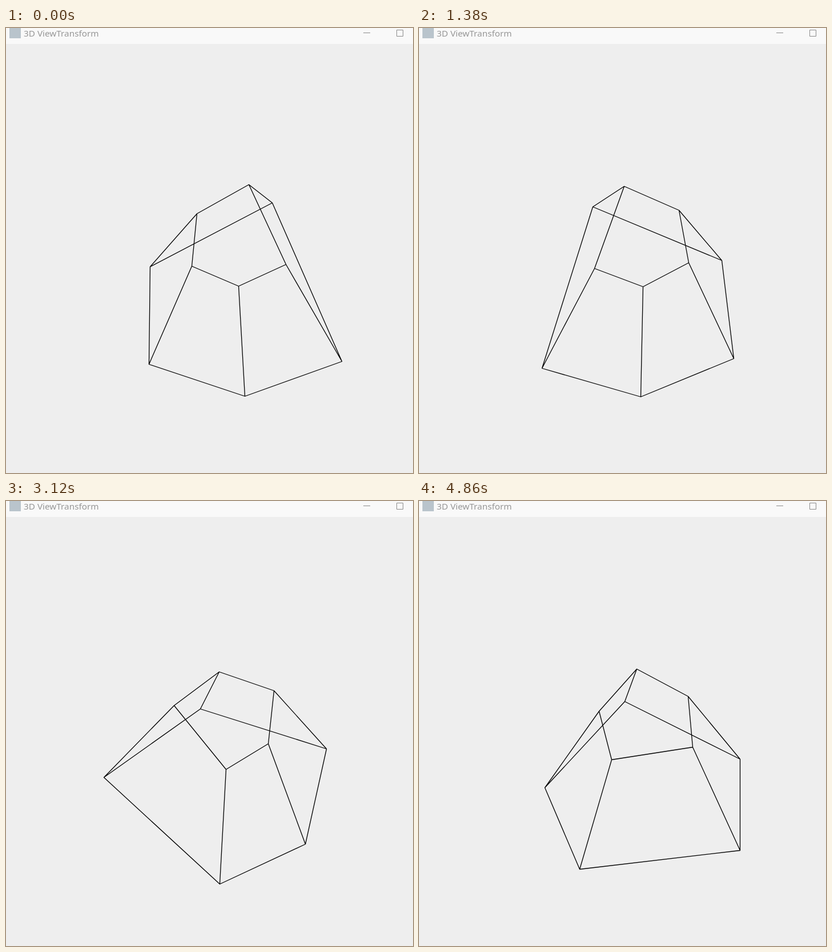
Animation of 713x780 px, one loop 4.92 s. Source, as an HTML page:

```html
<!DOCTYPE html>
<html lang="en">
<head>
<meta charset="utf-8">
<title>3D ViewTransform</title>
<style>
  html, body { margin: 0; width: 100%; height: 100%; overflow: hidden; background: #eee; }
  svg { display: block; }
  text { font: 15.3px "Noto Sans", "Open Sans", sans-serif; fill: #979797; }
</style>
</head>
<body>
<svg width="713" height="780" viewBox="0 0 713 780">
  <rect width="713" height="780" fill="#eee"/>
  <rect width="713" height="28" fill="#f9f9f9"/>
  <rect x="6" y="0" width="20" height="18" fill="#b9c4cc"/>
  <text x="31" y="15">3D ViewTransform</text>
  <path d="M626 8.5H638M684.5 3.5h11v11h-11z" fill="none" stroke="#8a8a8a"/>
  <path id="solid" fill="none" stroke="#000" stroke-width="1.3" stroke-linejoin="round"/>
</svg>
<script>
  const FRAME = 60, FRAMES = 82;
  const RAD = Math.PI / 180;

  // House-shaped outline around its centroid: [along the roof direction, across]
  const HOUSE = [[-7.2, -8], [2.8, -8], [8.8, 0], [2.8, 8], [-7.2, 8]];

  // Camera: focal length, image centre, tilt, sideways offset of the spin axis
  const FOCAL = 390, CX = 396.5, CY = 422.3, OFFSET = 12.3;
  const SIN = Math.sin(23.55 * RAD), COS = Math.cos(23.55 * RAD);
  const NEAR = 15.45, FAR = 39;

  // 50 steps of 7.2 degrees per turn, with a short rest once per turn
  const RATE = 1.464, PHASE = 0.7, REST_AT = 27, REST = 1.9, STEPS = 50;

  function spin(frame) {
    const n = frame * RATE + PHASE - REST_AT;
    const turn = Math.floor(n / (STEPS + REST));
    const rest = n - turn * (STEPS + REST) - REST;
    const step = REST_AT + turn * STEPS + Math.floor(Math.max(0, rest));
    return (152.33 + step * 360 / STEPS) * RAD;
  }

  function project([u, v], angle, height) {
    const c = Math.cos(angle), s = Math.sin(angle);
    const x = u * c - v * s;
    const y = u * s + v * c + OFFSET;
    const depth = height * COS + y * SIN;
    const px = CX + FOCAL * x / depth;
    const py = CY + FOCAL * (y * COS - height * SIN) / depth;
    return [Math.round(px) + 0.5, Math.round(py) + 0.5];
  }

  const solid = document.getElementById("solid");
  let shown = -1;

  function draw(ms) {
    const frame = Math.floor(ms / FRAME) % FRAMES;
    if (frame !== shown) {
      shown = frame;
      const angle = spin(frame);
      const near = HOUSE.map(p => project(p, angle, NEAR));
      const far = HOUSE.map(p => project(p, angle, FAR));
      const ring = pts => "M" + pts.join("L") + "Z";
      const struts = near.map((p, i) => "M" + p + "L" + far[i]).join("");
      solid.setAttribute("d", ring(near) + ring(far) + struts);
    }
  }

  const start = performance.now();
  function tick() {
    draw(performance.now() - start);
    requestAnimationFrame(tick);
  }
  tick();
</script>
</body>
</html>
```
